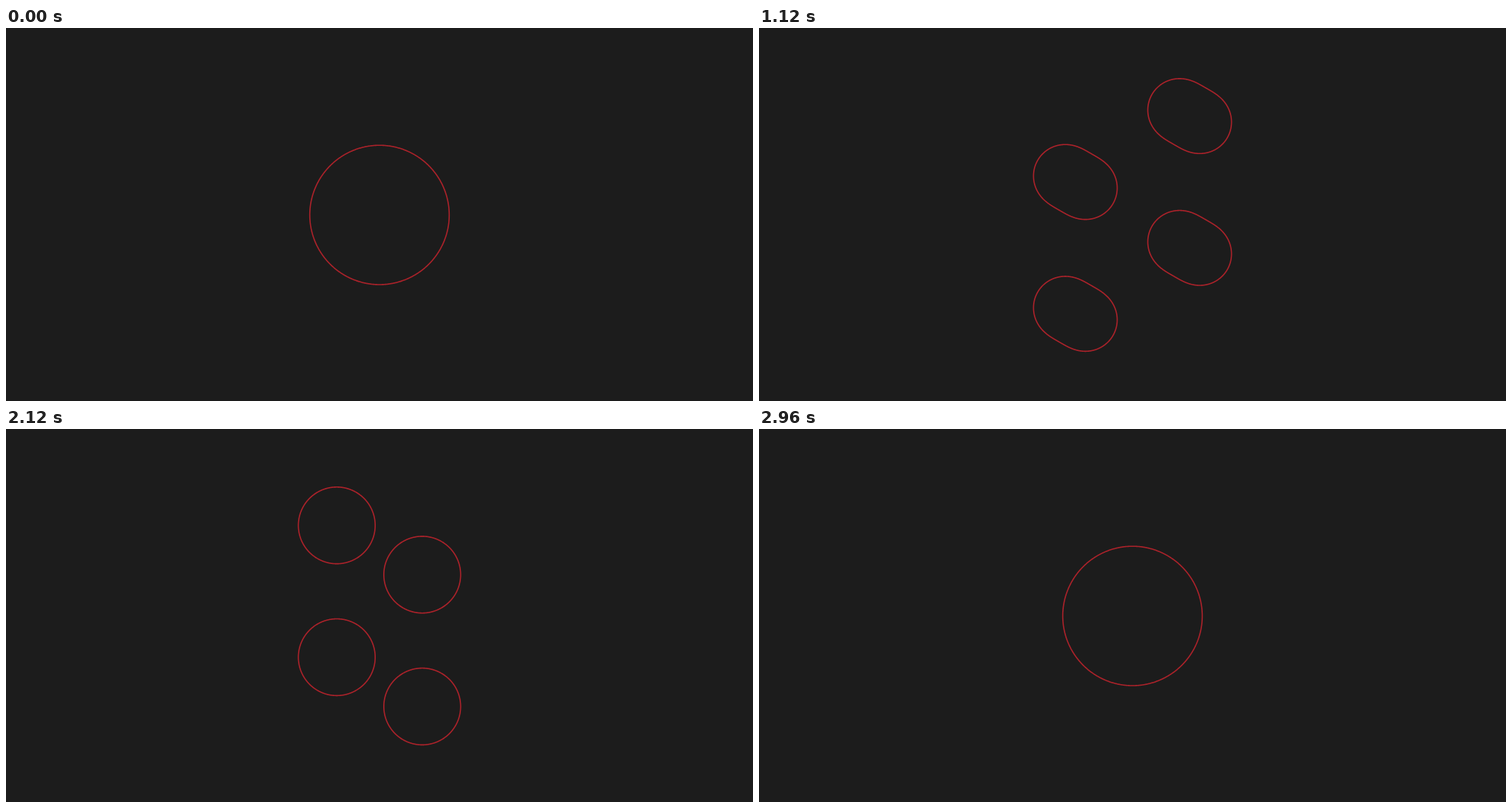
An HTML page with a canvas that plays this animation: 1000x500 px, repeating every 3 s.

```html
<!DOCTYPE html>
<html lang="en">
<head>
<meta charset="utf-8">
<title>Splitting circles</title>
<style>
  html, body { margin: 0; height: 100%; overflow: hidden; background: #1c1c1c; }
  canvas { display: block; }
</style>
</head>
<body>
<canvas id="stage" width="1000" height="500"></canvas>
<script>
const ctx = document.getElementById("stage").getContext("2d");
const LOOP = 3000, BACKGROUND = "#1c1c1c", LINE = "#ac222a", LINE_WIDTH = 1.6;
const REACH = 88.35;   // how far each half travels from its parent
const SINGLE = 0.88;   // size of one ball relative to two coinciding ones
const FALLOFF = -Math.LN2 / Math.log(SINGLE);

// Three successive splits, each along its own axis
const splits = [
  { start: 0, end: 630, angle: Math.PI / 2, from: 93.8, to: 69.8 },
  { start: 545, end: 1045, angle: -Math.PI / 6, from: 70.4, to: 50.7 },
  { start: 1045, end: 1495, angle: Math.PI / 6, from: 50.7, to: 35.2 }
];

const easeOut = u => 1 - (1 - u) ** 2;
const ease = u => easeOut(u ** 1.5);
const progress = (split, t) =>
  ease(Math.min(1, Math.max(0, (t - split.start) / (split.end - split.start))));

function shift(split, t) {
  const d = REACH * progress(split, t);
  return [d * Math.cos(split.angle), d * Math.sin(split.angle)];
}

// Outline of the ball at (+s, 0) up to the plane halfway to its twin at (-s, 0)
function halfOutline(s, radius, falloff) {
  const points = [], steps = 720;
  let merged = false;
  for (let i = 0; i < steps; i++) {
    const angle = -Math.PI + (i + 0.5) / steps * 2 * Math.PI;
    const cos = Math.cos(angle), sin = Math.sin(angle);
    const field = d =>
      (radius / d) ** falloff + (radius / Math.hypot(2 * s + d * cos, d * sin)) ** falloff;
    let low = 0, high = cos < 0 ? Math.min(2 * radius, s / -cos) : 2 * radius;
    if (high < 1e-6 || field(high) > 1) { merged = true; continue; }
    for (let k = 0; k < 18; k++) {
      const middle = (low + high) / 2;
      if (field(middle) > 1) low = middle; else high = middle;
    }
    points.push([s + low * cos, low * sin]);
  }
  return { points, merged };
}

function pairPath(split, t) {
  const e = progress(split, t);
  const start = split.from * SINGLE;
  const radius = start + (split.to - start) * easeOut(e) - LINE_WIDTH / 2;
  const { points, merged } = halfOutline(REACH * e, radius, FALLOFF + 10 * e * e);
  const c = Math.cos(split.angle), n = Math.sin(split.angle);
  const path = new Path2D();
  for (const side of [1, -1]) {
    points.forEach(([x, y], i) => {
      const px = side * (x * c - y * n), py = side * (x * n + y * c);
      if (i === 0 && (side === 1 || !merged)) path.moveTo(px, py);
      else path.lineTo(px, py);
    });
    if (!merged || side === -1) path.closePath();
  }
  return path;
}

function draw(time) {
  const t = time % LOOP;
  const returning = t > LOOP / 2;
  const phase = returning ? LOOP - t : t;
  const stage = phase < splits[1].start ? 0 : phase < splits[2].start ? 1 : 2;

  let centers = [[0, 0]];
  for (const split of splits.slice(0, stage)) {
    const [dx, dy] = shift(split, phase);
    centers = centers.flatMap(([x, y]) => [[x + dx, y + dy], [x - dx, y - dy]]);
  }
  const path = pairPath(splits[stage], phase);
  const shape = new Path2D();
  for (const [x, y] of centers) shape.addPath(path, new DOMMatrix().translate(x, y));

  ctx.setTransform(1, 0, 0, 1, 0, 0);
  ctx.fillStyle = BACKGROUND;
  ctx.fillRect(0, 0, 1000, 500);
  // The way back is the mirror image of the way out
  ctx.setTransform(returning ? -1 : 1, 0, 0, 1, 500, 250.6);
  ctx.strokeStyle = LINE;
  ctx.lineWidth = 2 * LINE_WIDTH;
  ctx.lineJoin = "round";
  ctx.stroke(shape);
  ctx.fill(shape); // hides inner lines where shapes overlap
}

const began = performance.now();
function tick() {
  draw(performance.now() - began + 20);
  requestAnimationFrame(tick);
}
tick();
</script>
</body>
</html>
```
